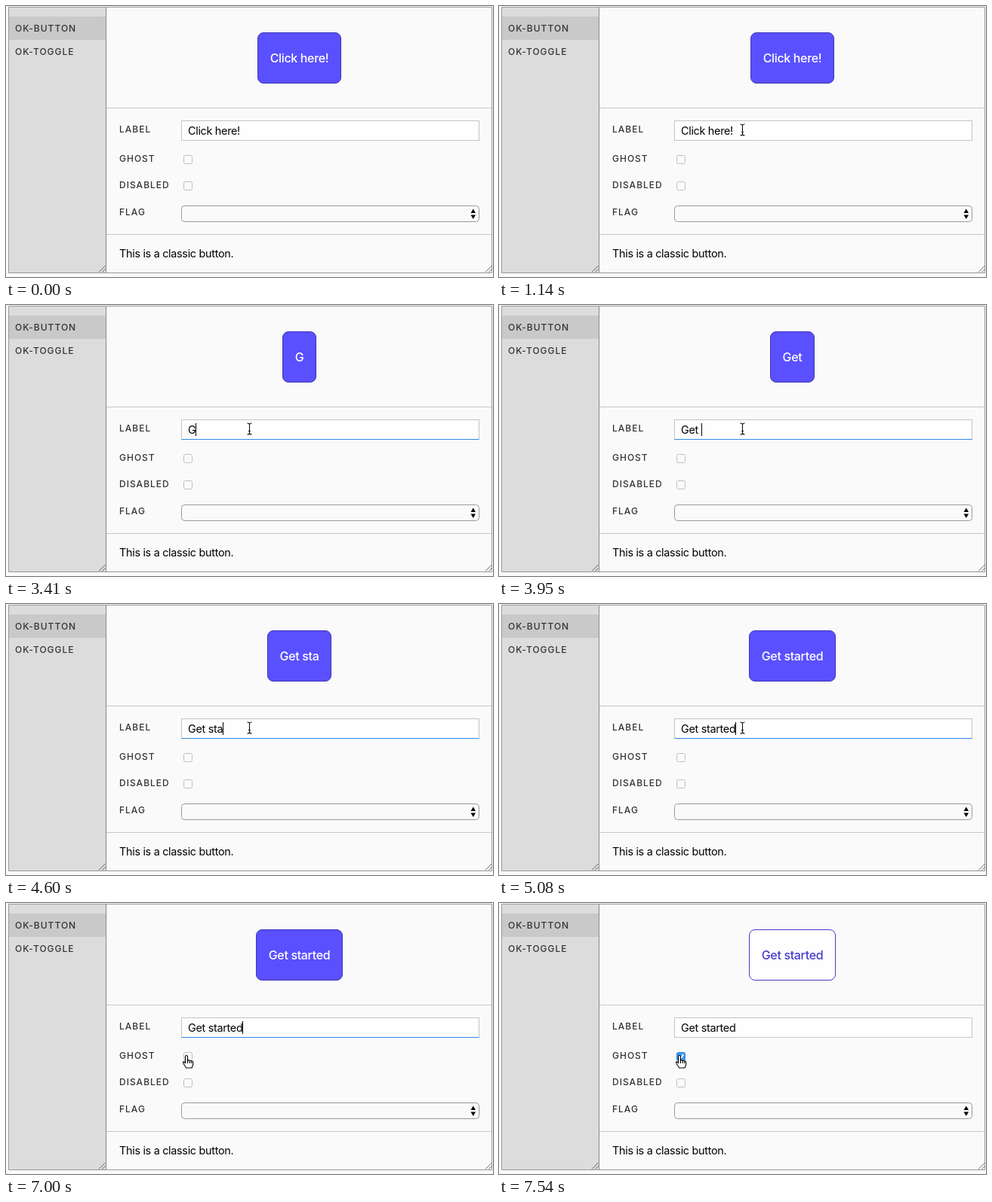
Write an HTML page that moves like this. It is 645 px wide and 360 px high and loops after 8000 ms.

```html
<!DOCTYPE html>
<html lang="en">
<head>
<meta charset="utf-8">
<title>Button playground</title>
<style>
  html, body { margin: 0; width: 100%; height: 100%; overflow: hidden; background: #fafafa; }
  body { position: relative; font-family: Inter, sans-serif; }
  svg { position: absolute; left: 0; top: 0; width: 645px; height: 360px; }
  .caps { font-size: 12px; letter-spacing: 1px; font-weight: 500; fill: #333; }
  .body, #field { font-size: 14.4px; letter-spacing: -.3px; }
  #preview {
    position: absolute; left: 133px; top: 35px; width: 511px; height: 68px;
    display: flex; justify-content: center;
  }
  #button {
    display: flex; align-items: center; box-sizing: border-box; padding: 0 16px;
    border: 1px solid #3d35b4; border-radius: 8px; background: #5a50ff;
    color: #fff; font-size: 16px; font-weight: 500; letter-spacing: -.35px;
  }
  #button.ghost { background: #fefefe; border-color: #453bc8; color: #453bc8; }
  #field {
    position: absolute; left: 232px; top: 152px; width: 395px; height: 27px;
    box-sizing: border-box; padding: 4px 8px; border: 1px solid #c4c4c4;
    background: #fefefe; line-height: 17px; white-space: pre; color: #000;
  }
  #field.focus { border-bottom-color: #2f8ae8; }
  #field span { display: inline-block; height: 17px; }
  #field.caret span { box-shadow: 1px 0 #000; }
  #field.selected span { background: #b2d5fd; }
</style>
</head>
<body>
<svg viewBox="0 0 645 360">
  <path fill="#dcdcdc" d="M4 2H133V354H4Z"/>
  <path fill="#c9c9c9" d="M4 14H132V45H4Z"/>
  <g fill="none" stroke="#999">
    <path d="M3.5 1.5H643.5V354.5H3.5Z"/>
    <path stroke="#888" d="M132.5 2V354"/>
    <path stroke="#c8c8c8" d="M133 135.5H643M133 303.5H643"/>
    <path stroke="#555" stroke-width=".9" d="M123 353.5L131.5 345M127.5 353.5L131.5 349.5M635 353.5L643.5 345M639.5 353.5L643.5 349.5"/>
    <rect x="232.5" y="265.5" width="394" height="21" rx="4"/>
    <g stroke="#c0c0c0">
      <rect id="check" x="235.5" y="198.5" width="11" height="11" rx="2"/>
      <rect x="235.5" y="233.5" width="11" height="11" rx="2"/>
    </g>
    <path id="tick" stroke="#fff" stroke-width="1.7" d="M238 204.5L240.4 207L244.3 201"/>
  </g>
  <path d="M615.5 275L618.8 269.5L622 275ZM615.5 277.5L618.8 283L622 277.5Z"/>
  <g class="caps">
    <text x="12" y="34">OK-BUTTON</text>
    <text x="12" y="65">OK-TOGGLE</text>
    <text x="150" y="168">LABEL</text>
    <text x="150" y="207">GHOST</text>
    <text x="150" y="242">DISABLED</text>
    <text x="150" y="278">FLAG</text>
  </g>
  <text class="body" x="150" y="334">This is a classic button.</text>
</svg>
<div id="preview"><div id="button"></div></div>
<div id="field"><span></span></div>
<svg viewBox="0 0 645 360">
  <g id="cursor" stroke-linejoin="round">
    <path id="arrow" stroke="#fff" stroke-width="2" paint-order="stroke" d="M0 0V13.5L3 10.7L5.3 15.8L7.4 14.9L5.2 9.9H9.5Z"/>
    <path id="beam" fill="none" stroke="#111" stroke-width="1.1" d="M-3 -7.5Q0 -7.5 0 -5.5Q0 -7.5 3 -7.5M0 -5.5V5.5M-3 7.5Q0 7.5 0 5.5Q0 7.5 3 7.5M-1.5 3H1.5"/>
    <path id="hand" fill="#fff" stroke="#000" stroke-width="1.1" d="M-2 -.5c0-2 3-2 3 0V5c.5-1.3 2.6-1 2.7.3 .6-1 2.4-.7 2.5.6 .6-.7 2-.3 2 1V10c0 2-1.5 3-1.5 4.5H-1C-1.5 12.5-4.5 10-5 7.5c-.2-1.5 1.5-1.8 3 .8ZM1 5V8.5M3.7 5.3V8.5M6.2 6V8.5"/>
  </g>
</svg>
<script>
const DURATION = 8000;
const FOCUS = 1800, SELECT = 2570, BLUR = 7420, CHECK = 7540;
const BLINK = 960, BLINK_ON = 470;
const POINTER_STEP = 56.25;

// Each word is typed at its own even pace.
const WORDS = [
  { text: 'Get ', start: 3410, pace: 180 },
  { text: 'started', start: 4190, pace: 148 }
];

// Cubic curves along which the pointer travels.
const MOVES = [
  { start: 500, steps: 11, ease: 1, curve: [[446, 345], [430, 264], [370, 205], [322.5, 164.5]] },
  { start: 6030, steps: 17, ease: 1.2, curve: [[322.5, 164.5], [410, 213], [245, 278], [239.5, 204.5]] }
];

const $ = id => document.getElementById(id);
const show = (el, on) => el.setAttribute('visibility', on ? 'visible' : 'hidden');

function bezier([a, b, c, d], p) {
  const q = 1 - p;
  return [0, 1].map(i => q ** 3 * a[i] + 3 * q * q * p * b[i] + 3 * q * p * p * c[i] + p ** 3 * d[i]);
}

function pointerAt(time) {
  const move = MOVES.findLast(m => m.start <= time);
  if (!move) return null;
  const t = Math.min(1, Math.floor((time - move.start) / POINTER_STEP) / move.steps);
  return bezier(move.curve, 1 - (1 - t) ** move.ease);
}

function drawPointer(time) {
  const point = pointerAt(time);
  const [x, y] = point || [0, 0];
  const overField = x > 232 && x < 627 && y > 152 && y < 179;
  const overCheck = x > 234 && x < 247 && y > 198 && y < 212;
  $('cursor').setAttribute('transform', `translate(${x} ${y})`);
  show($('beam'), point && overField);
  show($('hand'), point && overCheck);
  show($('arrow'), point && !overField && !overCheck);
}

function typing(time) {
  let typed = '', lastInput = FOCUS;
  for (const { text, start, pace } of WORDS) {
    if (time < start) break;
    const count = Math.min(text.length, 1 + Math.floor((time - start) / pace));
    typed += text.slice(0, count);
    lastInput = start + (count - 1) * pace;
  }
  return { typed, lastInput };
}

function draw(time) {
  const { typed, lastInput } = typing(time);
  const label = typed || 'Click here!';
  const focused = time >= FOCUS && time < BLUR;
  const selected = time >= SELECT && !typed;
  const checked = time >= CHECK, pressed = time >= BLUR && !checked;
  const field = $('field');

  $('button').textContent = label;
  $('button').classList.toggle('ghost', checked);
  field.firstChild.textContent = label;
  field.classList.toggle('focus', focused);
  field.classList.toggle('selected', selected);
  field.classList.toggle('caret', focused && !selected && (time - lastInput) % BLINK < BLINK_ON);

  $('check').setAttribute('fill', checked ? '#3b99fc' : pressed ? '#dedede' : 'none');
  $('check').setAttribute('stroke', checked ? '#2b82dd' : '#c0c0c0');
  show($('tick'), checked);
  drawPointer(time);
}

const began = performance.now();
function frame() {
  draw((performance.now() - began) % DURATION);
  requestAnimationFrame(frame);
}
frame();
</script>
</body>
</html>
```
